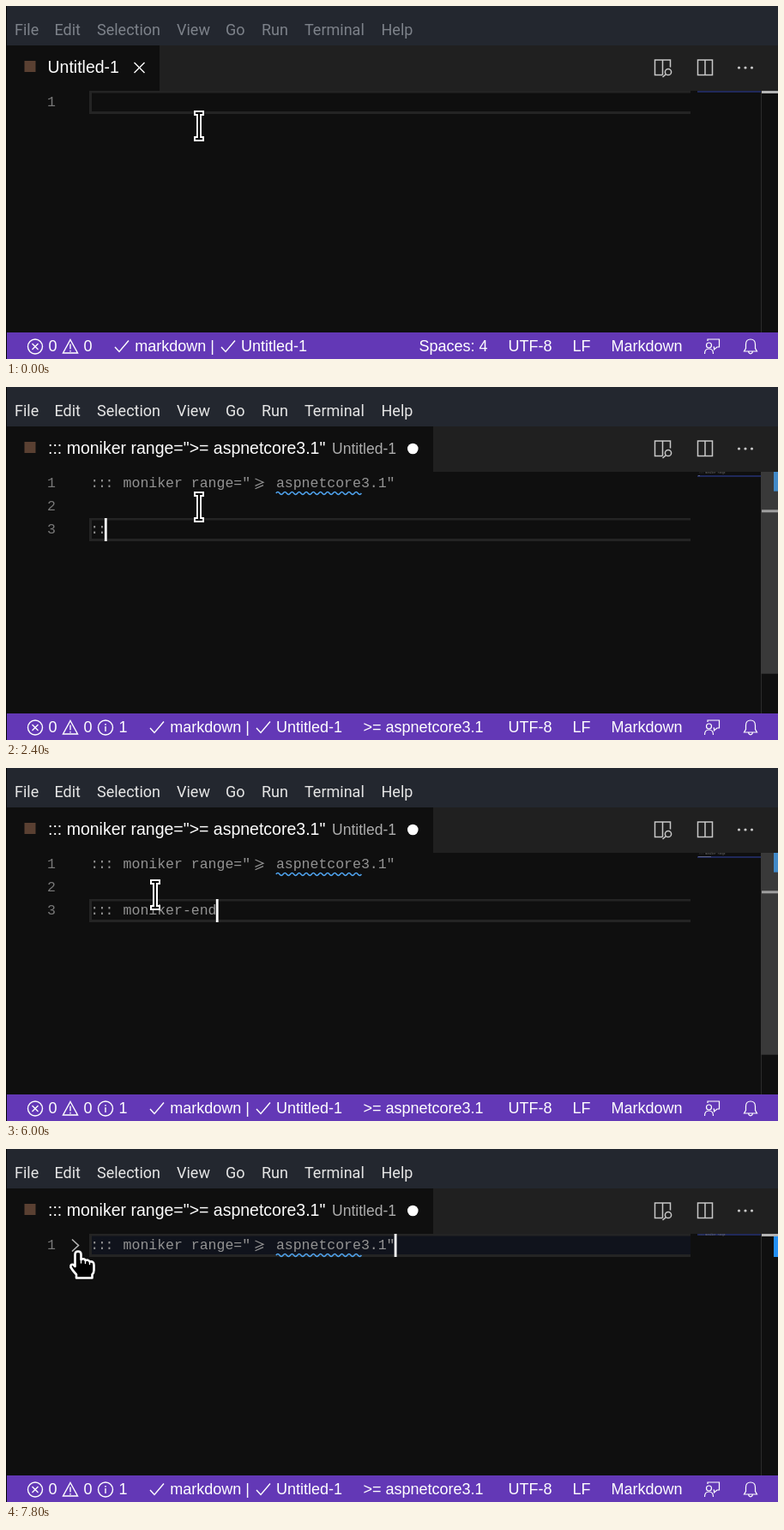
Recreate the animation shown at these times as an HTML page. Size 900x412 px, loop 8000 ms.

```html
<!DOCTYPE html>
<html lang="en">
<head>
<meta charset="utf-8">
<title>Editor folding</title>
<style>
  html, body { margin: 0; width: 100%; height: 100%; overflow: hidden; background: #0f0f0f; }
  svg { display: block; width: 900px; height: 412px; }
  text { white-space: pre; }
  .menu { font: 18px Roboto, sans-serif; }
  .tab { font: 19.5px "Liberation Sans", sans-serif; fill: #fff; }
  .desc { font-size: 17.55px; fill: #adadad; }
  .code { font: 16.5px "Liberation Mono", monospace; fill: #939393; }
  .colons { letter-spacing: -1.3px; }
  .num { fill: #787878; }
  .bar { font: 18px "Liberation Sans", sans-serif; fill: #fff; }
  .line { fill: none; stroke: #fff; stroke-width: 1.4; }
  .thin { fill: none; stroke: #fff; stroke-width: 1.2; }
  .tool { fill: none; stroke: #c8c8c8; stroke-width: 1.5; }
  .wave { fill: none; stroke: #4fa3ee; stroke-width: 1.5; }
  .tiny { font: 3px "Liberation Mono", monospace; fill: #777; }
</style>
</head>
<body>
<svg viewBox="0 0 900 412">
  <defs>
    <path id="check" d="M0 8 L5 13.5 L16 0.5" class="line"/>
    <g id="beam" fill="none">
      <path d="M-6 -15H6M0 -15V15M-6 15H6" stroke="#fff" stroke-width="6"/>
      <path d="M-4 -15H4M0 -15V15M-4 15H4" stroke="#000" stroke-width="2"/>
    </g>
    <g id="hand" stroke="#fff" stroke-linejoin="round" stroke-linecap="round">
      <path d="M-3.5 3.5Q-3.5 0 0 0Q3.5 0 3.5 3.5V9.5Q7 7.500 8.500 10.500Q12 9 13.500 12Q18.500 11 18.500 16V22Q18.500 25 16.500 27V31H-2V27Q-6 23 -8.500 18.500Q-9 14.500 -5.500 15.500L-3.500 17.500Z" fill="#000" stroke-width="2.6"/>
      <path d="M3.500 10V13.500M8.500 11V14M13.500 12.500V15" stroke-width="1.4"/>
    </g>
  </defs>

  <rect width="900" height="412" fill="#0f0f0f"/>
  <rect width="900" height="46" fill="#23272f"/>
  <rect y="46" width="900" height="53" fill="#202020"/>
  <rect id="tabBack" y="46" height="53" fill="#0f0f0f"/>
  <g id="menu" class="menu">
    <text x="10" y="34">File</text><text x="56.500" y="34">Edit</text>
    <text x="106" y="34">Selection</text><text x="199" y="34">View</text>
    <text x="256" y="34">Go</text><text x="298" y="34">Run</text>
    <text x="348" y="34">Terminal</text><text x="437.500" y="34">Help</text>
  </g>

  <rect x="21.500" y="64" width="13" height="13" fill="#5a4032"/>
  <g id="cleanTab">
    <text class="tab" x="48.500" y="78">Untitled-1</text>
    <path d="M149.500 66 L161.500 78 M161.500 66 L149.500 78" class="line"/>
  </g>
  <g id="dirtyTab">
    <text class="tab" x="49" y="78">::: moniker range="&gt;= aspnetcore3.1"</text>
    <text class="tab desc" x="380" y="78">Untitled-1</text>
    <circle cx="474.300" cy="72" r="6.300" fill="#fff"/>
  </g>
  <g class="tool">
    <path d="M765.500 80.500H756.500V63H774.500V71.500M765.500 63V80.500"/>
    <circle cx="772" cy="77" r="3.600"/><path d="M769.500 79.500L765.500 83"/>
    <path d="M806.500 63H823.500V80.500H806.500ZM815 63V80.500"/>
  </g>
  <g fill="#c8c8c8">
    <circle cx="854.500" cy="72" r="1.600"/><circle cx="862" cy="72" r="1.600"/><circle cx="869.500" cy="72" r="1.600"/>
  </g>

  <rect id="foldBack" x="97" y="99" width="701" height="27" fill="#10131c"/>
  <g id="current" fill="#242424">
    <rect x="97" width="701" height="2.500"/>
    <rect x="97" y="24" width="701" height="3"/>
    <rect x="97" width="3" height="27"/>
  </g>
  <g class="code">
    <text class="num" x="48" y="117">1</text>
    <text class="num" id="num2" x="48" y="144">2</text>
    <text class="num" id="num3" x="48" y="171">3</text>
    <g id="first">
      <text class="colons" x="98.300" y="117">:::</text>
      <text x="136.600" y="117">moniker range="</text>
      <path d="M290.500 107L300 111.200L290.500 115.400M290.500 118.800L300 114.600" fill="none" stroke="#939393" stroke-width="1.200"/>
      <text x="305" y="117"> aspnetcore3.1"</text>
    </g>
    <g id="third">
      <text id="colons" class="colons" x="98.300" y="171"></text>
      <text id="word" x="136.600" y="171"></text>
    </g>
  </g>
  <path id="wave1" class="wave"/>
  <path id="wave3" class="wave"/>
  <rect id="caret" width="2.800" height="27" fill="#fff"/>
  <path id="chevDown" d="M74 109L80.500 115.500L87 109" fill="none" stroke="#b5b5b5" stroke-width="1.600"/>
  <path id="chevRight" d="M77 105.500L84.500 112.500L77 119.500" fill="none" stroke="#b5b5b5" stroke-width="1.600"/>

  <rect id="mapLine" x="806" width="74" height="2" fill="#20295a"/>
  <text id="map1" class="tiny" x="808" y="101">::: moniker range</text>
  <rect id="map3" x="807" y="103" height="1" fill="#5b6080"/>
  <rect x="880" y="99" width="1" height="282" fill="#2b2b2b"/>
  <rect id="slider" x="880" y="99" width="20" fill="#393939"/>
  <rect id="mark1" x="895" y="99" width="5"/>
  <rect id="mark3" x="895" width="5" fill="#4189c8"/>
  <rect id="spot" x="881" width="19" height="3"/>

  <rect y="381" width="900" height="31" fill="#6338b6"/>
  <g class="line">
    <circle cx="34" cy="397.500" r="8.500"/>
    <path d="M30.500 394L37.500 401M37.500 394L30.500 401"/>
    <path d="M75 389.500L83.500 405H66.500ZM75 394.500V400.500M75 402V403.500"/>
  </g>
  <g class="bar">
    <text x="49.500" y="403">0</text><text x="90.500" y="403">0</text>
    <g id="info">
      <circle cx="116" cy="397.500" r="8.500" class="line"/>
      <path d="M116 396V402M116 393V394.700" class="line"/>
      <text id="count" x="131.500" y="403">1</text>
    </g>
    <g id="checks">
      <use href="#check" x="127" y="390"/><text x="150.300" y="403">markdown |</text>
      <use href="#check" x="251" y="390"/><text x="274" y="403">Untitled-1</text>
    </g>
    <text id="spaces" x="481.500" y="403">Spaces: 4</text>
    <text id="range" x="416.500" y="403">&gt;= aspnetcore3.1</text>
    <text x="585.500" y="403">UTF-8</text><text x="660.500" y="403">LF</text><text x="705.500" y="403">Markdown</text>
  </g>
  <g class="thin">
    <path d="M818 391V389H831.500V398H829L825.500 401V398H824.500"/>
    <circle cx="819.500" cy="396" r="3"/>
    <path d="M814.500 406Q814.500 400 819.500 400Q824.500 400 824.500 406"/>
    <path d="M860.500 403H875.500L873.500 399.500V395Q873.500 389 868 389Q862.500 389 862.500 395V399.500ZM865.500 403Q866 405.800 868 405.800Q870 405.800 870.500 403"/>
  </g>
  <use id="mouse"/>
  <rect width="1" height="412" fill="#050505"/>
</svg>
<script>
  const LOOP = 8000, STEP = 100, CELL = 9.9, LEFT = 97, TOP = 99, ROW = 27, VIEW = 282;
  const LINE = '::: moniker-end';
  // moment each character of the last line is typed
  const KEYS = [2200, 2400, 2700, 3200, 3400, 3500, 3600, 3700, 3800, 3900, 4100, 4300, 4500, 4600, 4700];
  // pointer path: time, x, y
  const PATH = [[5200, 225, 140], [5600, 204, 142], [6000, 174, 148], [6100, 159, 149], [6400, 100, 130],
    [6500, 58, 112], [6600, 74.5, 107.5], [7100, 83, 120.5], [7300, 84, 119.5]];
  const $ = id => document.getElementById(id);
  const show = (id, on) => { $(id).style.display = on ? '' : 'none'; };
  const set = (id, attrs) => { for (const k in attrs) $(id).setAttribute(k, attrs[k]); };

  function wave(x, y, cells) {
    const half = 4.15, n = Math.round(cells * CELL / half);
    return `M${x} ${y}q${half / 2} -2.8 ${half} 0` + `t${half} 0`.repeat(n - 1);
  }

  function pointer(t) {
    if (t <= PATH[0][0]) return PATH[0].slice(1);
    const i = PATH.findIndex(p => p[0] > t);
    if (i < 0) return PATH[PATH.length - 1].slice(1);
    const [t0, x0, y0] = PATH[i - 1], [t1, x1, y1] = PATH[i], k = (t - t0) / (t1 - t0);
    return [x0 + (x1 - x0) * k, y0 + (y1 - y0) * k];
  }

  function caretAlpha(t) {
    if (t < 300) return 0;
    if (t < 1700) return 1;
    if (t < 1900) return t < 1800 ? 0.6 : 0;
    if (t < 5300) return 1;
    const phase = (t - 5300) % 1000;
    return phase < 100 ? 0.5 : phase < 500 ? 0 : 1;
  }

  // the colons sit closer together until the third joins them
  function caretX(column) {
    if (!column) return LEFT;
    return LEFT - 0.7 + column * (column < 3 ? 9.3 : CELL);
  }

  function draw(t) {
    const pasted = t >= 1000, checked = t >= 1100, folded = t >= 7500;
    const rows = folded || t < 1900 ? 1 : t < 2000 ? 2 : 3;
    const typed = KEYS.filter(k => k <= t).length;
    const flagged = t >= 4000 && t < 4400;
    const scale = VIEW / (VIEW + (rows - 1) * ROW);
    const rowTop = TOP + (rows - 1) * ROW;

    set('menu', { fill: t < 300 ? '#7d828a' : '#e6e6e6' });
    set('tabBack', { width: pasted ? 498 : 179 });
    show('cleanTab', !pasted);
    show('dirtyTab', pasted);
    show('first', pasted);
    show('wave1', checked);
    show('info', checked);
    show('range', checked);
    show('spaces', !checked);
    set('checks', { transform: `translate(${checked ? 41 : 0})` });
    $('count').textContent = flagged ? 2 : 1;

    show('num2', rows > 1);
    show('num3', rows > 2);
    show('foldBack', folded);
    show('third', rows > 2);
    $('colons').textContent = LINE.slice(0, Math.min(typed, 3));
    $('word').textContent = LINE.slice(4, Math.max(typed, 4));
    show('wave3', flagged);
    set('wave3', { d: wave(LEFT + 4 * CELL, 178, Math.max(1, Math.min(typed, 11) - 4)) });
    set('current', { transform: `translate(0 ${rowTop})` });
    const column = rows === 1 ? (pasted ? 36 : 0) : rows === 2 ? 0 : typed;
    set('caret', { x: caretX(column), y: rowTop, opacity: caretAlpha(t) });

    set('mapLine', { y: 99 + (rows - 1) * 2 });
    show('map1', pasted);
    show('map3', rows > 2 && typed > 0);
    set('map3', { width: typed });
    show('slider', rows > 1);
    set('slider', { height: VIEW * scale - 1 });
    show('mark1', checked);
    set('mark1', { height: ROW * scale, fill: rows > 1 ? '#4189c8' : '#2490f5' });
    show('mark3', flagged);
    set('mark3', { y: TOP + 2 * ROW * scale, height: ROW * scale });
    set('spot', { y: TOP + (rows - 1) * ROW * scale - (rows > 1 ? 1 : 0), fill: rows > 1 ? '#a0a0a0' : '#b4b4b4' });

    show('chevDown', t >= 6400 && !folded);
    set('chevDown', { opacity: Math.min(1, (t - 6300) / 600) });
    show('chevRight', folded);
    const [x, y] = pointer(t);
    set('mouse', { href: t < 6500 ? '#beam' : '#hand', transform: `translate(${x} ${y})` });
  }

  set('wave1', { d: wave(LEFT + 22 * CELL, 124, 10) });
  const start = performance.now();
  function tick() {
    const t = (performance.now() - start) % LOOP;
    draw(Math.floor(t / STEP) * STEP);
    requestAnimationFrame(tick);
  }
  draw(0);
  requestAnimationFrame(tick);
</script>
</body>
</html>
```
